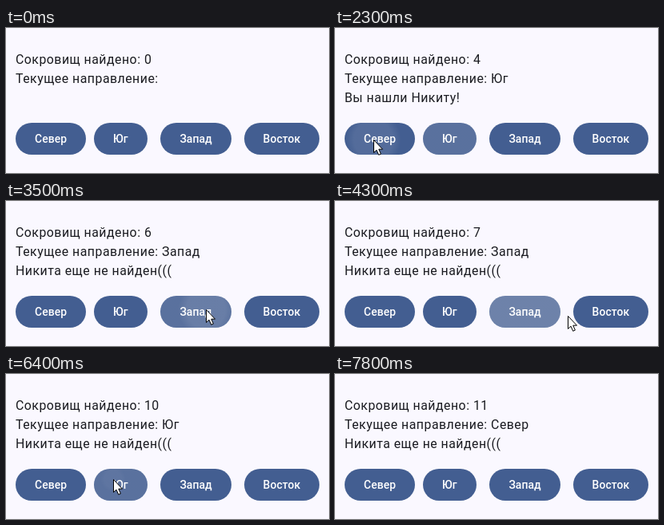
Write an HTML page that moves like this. It is 404x182 px and loops after 8600 ms.

```html
<!DOCTYPE html>
<html lang="ru">
<meta charset="utf-8">
<style>
  html, body { margin: 0; width: 100%; height: 100%; overflow: hidden; background: #faf8ff; }
  body { position: relative; font-family: Roboto, sans-serif; }
  #info { position: absolute; left: 12px; top: 28px; font-size: 15.85px; line-height: 24px;
    letter-spacing: .5px; color: #1a1b20; white-space: pre; }
  .btn { position: absolute; top: 119px; height: 40px; padding: 0 24px; border-radius: 20px;
    overflow: hidden; background: #435e91; color: #fff; font-size: 13.85px; font-weight: 500;
    line-height: 40px; letter-spacing: .1px; }
  .ripple { position: absolute; width: 260px; height: 260px; margin: -130px; border-radius: 50%;
    background: radial-gradient(circle closest-side, #fff 70%, transparent); }
  svg { position: absolute; left: 0; top: 0; }
</style>
<body>
<div id="info"></div>
<script>
const LOOP = 8600, STEP = 100, TOP = 119;
const buttons = [['Север', 12], ['Юг', 110], ['Запад', 193.4], ['Восток', 297.6]];

// Pointer stops: arrival, departure, x, y, and one digit per press (1 = treasure found).
const stops = [
  [100, 100, 210, 173, ''],
  [400, 1850, 140, 139, '1111'],
  [2250, 2500, 48, 140, '10'],
  [2850, 2900, 340, 135, '1'],
  [3250, 4050, 250, 136, '00100'],
  [4300, 4300, 291, 144, ''],
  [4800, 5100, 340, 139, '111'],
  [5400, 5450, 234, 142, ''],
  [5950, 6400, 134, 132, '00'],
  [6800, 7050, 55, 137, '10'],
  [7700, 7800, 112, 46, '']
];

const info = document.getElementById('info');
const clamp = v => Math.max(0, Math.min(1, v));
const ease = v => v * v * (3 - 2 * v);

function add(parent, cls, left) {
  const el = document.createElement('div');
  el.className = cls;
  el.style.left = left + 'px';
  return parent.appendChild(el);
}

const faces = buttons.map(([label, left]) => {
  const el = add(document.body, 'btn', left);
  el.textContent = label;
  return el;
});

// Presses are spread evenly over each stop.
let count = 0;
const presses = stops.flatMap(([from, to, x, y, rolls]) => [...rolls].map((roll, i) => {
  const b = buttons.filter(([, left]) => left <= x).length - 1;
  const ripple = add(faces[b], 'ripple', x - buttons[b][1]);
  ripple.style.top = y - TOP + 'px';
  count += +roll;
  const time = from + (to - from) * i / Math.max(1, rolls.length - 1);
  return { time, name: buttons[b][0], count, found: roll === '1', ripple };
}));

document.body.insertAdjacentHTML('beforeend', `<svg width="404" height="182">
  <path id="arrow" d="M.5 .5V16.5L4 13.2L6.7 19.3L9.4 18.1L6.8 12.2H11.5Z"
    fill="#fff" stroke="#000" stroke-linejoin="round"/></svg>`);
const arrow = document.getElementById('arrow');

function pointerAt(t) {
  const i = Math.max(0, stops.findLastIndex(s => s[0] <= t));
  const [, leave, x, y] = stops[i];
  const [arrive, , nx, ny] = stops[i + 1] || stops[i];
  const k = t > leave ? ease(clamp((t - leave) / (arrive - leave))) : 0;
  return [x + (nx - x) * k, y + (ny - y) * k];
}

function draw(t) {
  const last = presses.findLast(p => p.time + 100 <= t);
  info.textContent = `Сокровищ найдено: ${last ? last.count : 0}\nТекущее направление: `;
  if (last) info.textContent += last.name +
    (last.found ? '\nВы нашли Никиту!' : '\nНикита еще не найден(((');

  for (const { time, ripple } of presses) {
    const age = t - time;
    ripple.style.opacity = age < 0 ? 0 : .12 * clamp((age + 25) / 100) * clamp((650 - age) / 200);
    ripple.style.transform = `scale(${.12 + .88 * clamp(age / 300)})`;
  }

  arrow.setAttribute('transform', `translate(${pointerAt(t)})`);
  arrow.style.display = t >= 100 && t < 7800 ? '' : 'none';
}

const start = performance.now();
function tick() {
  const t = (performance.now() - start) % LOOP;
  draw(Math.floor(t / STEP) * STEP);
  requestAnimationFrame(tick);
}
tick();
</script>
</body>
</html>
```
